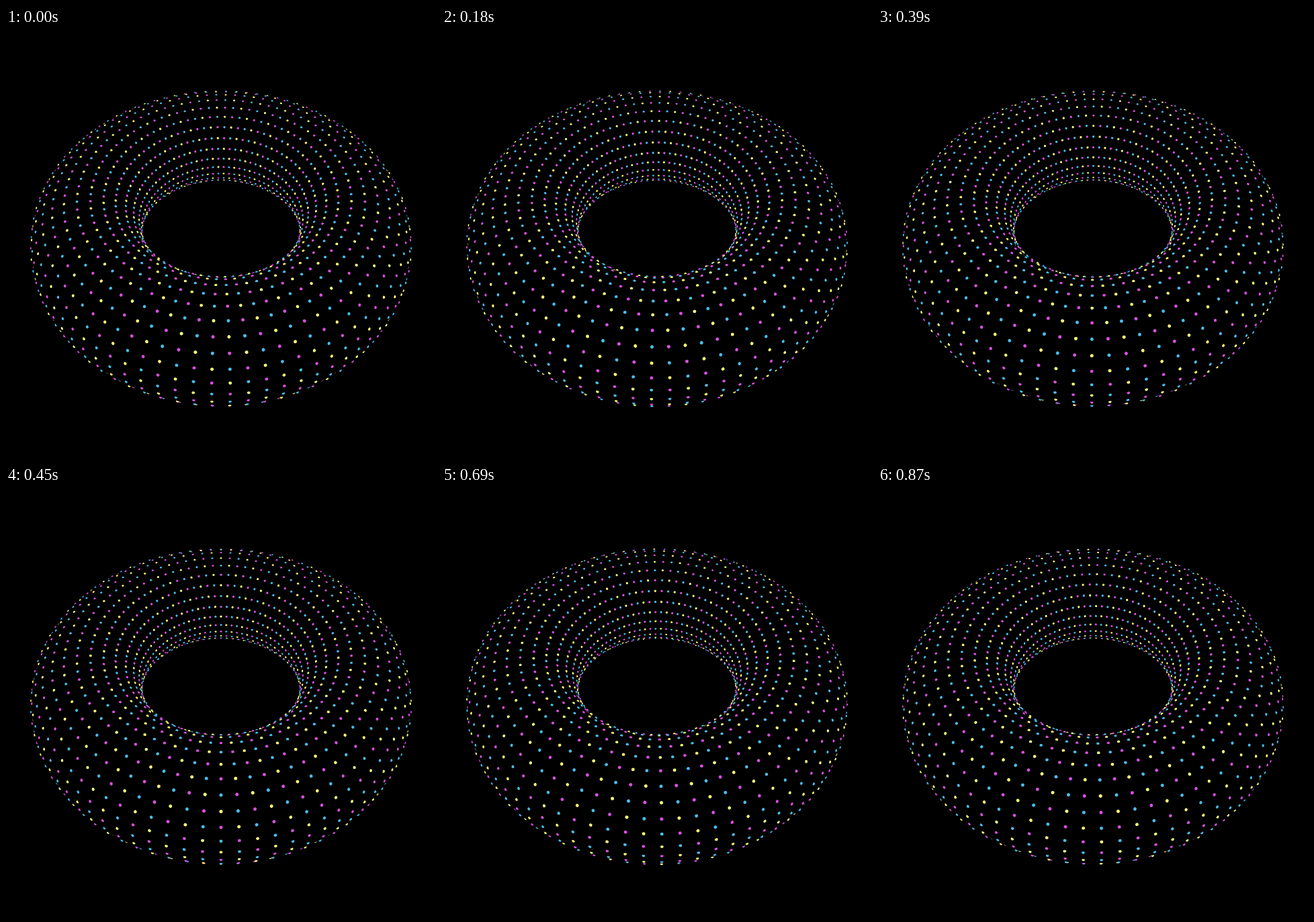
These frames come from a looping animation (640x640 px, 0.9 s). An HTML page with a canvas:

```html
<!DOCTYPE html>
<html lang="en">
<head>
<meta charset="utf-8">
<title>Dotted torus</title>
<style>
  html, body { margin: 0; width: 100%; height: 100%; overflow: hidden; background: #000; }
  canvas { display: block; width: 640px; height: 640px; }
</style>
</head>
<body>
<canvas id="stage" width="640" height="640"></canvas>
<script>
const ctx = document.getElementById('stage').getContext('2d');
const TAU = Math.PI * 2;
const LOOP = 900, STEP = 30;
const COLS = 84, ROWS = 28;
const COLORS = ['#d950e0', '#fcfc78', '#48bdec'];

// Tube radius is 1; the camera looks down at the ring.
const RING = 2.5705, DIST = 8.6105, LIFT = 0.4665, FOCAL = 648;
const CENTER = 320;
const TILT = 51.89 * Math.PI / 180;
const SIN = Math.sin(TILT), COS = Math.cos(TILT);
const DOT = 0.0234, ROW_PHASE = 0.155;
const HIDDEN = -Math.sqrt(2 * DOT);

// Tilt a vector: x right, y down, z away from the viewer.
function tilt(x, up, front) {
  return [x, front * SIN - up * COS, -front * COS - up * SIN];
}

// Each dot is a small ball half sunk into a black surface.
function drawDot(u, v, color) {
  const su = Math.sin(u), cu = Math.cos(u);
  const sv = Math.sin(v), cv = Math.cos(v);
  const rad = RING + cv;
  const [x, down, depth] = tilt(rad * su, sv, rad * cu);
  const y = down - LIFT, z = depth + DIST;
  const [nx, ny, nz] = tilt(cv * su, sv, cv * cu);

  const len = Math.hypot(x, y, z);
  const facing = -(nx * x + ny * y + nz * z) / len;
  if (facing <= HIDDEN) return;

  const scale = FOCAL / z;
  const px = CENTER + x * scale, py = CENTER + y * scale;
  const r = DOT * scale;
  const angle = Math.atan2(ny + facing * y / len, nx + facing * x / len);
  const inner = facing > 0 ? facing : facing * facing / (2 * DOT);
  ctx.fillStyle = color;
  ctx.beginPath();
  ctx.ellipse(px, py, r, r, angle, -TAU / 4, TAU / 4);
  ctx.ellipse(px, py, r * inner, r, angle, TAU / 4, -TAU / 4, facing < 0);
  ctx.fill();
}

// Per loop every dot advances one column and two rows.
function draw(p) {
  ctx.fillStyle = '#000';
  ctx.fillRect(0, 0, 640, 640);
  const shift = 2 * p + ROW_PHASE;
  const first = Math.ceil(-ROWS / 4 - shift);
  for (let i = 0; i < COLS; i++) {
    const u = (i + 0.5 + p) / COLS * TAU;
    for (let k = first; k < first + ROWS; k++) {
      drawDot(u, (k + shift) / ROWS * TAU, COLORS[(i + k + 32) % 3]);
    }
  }
}

const start = performance.now();
let shown = -1;
function tick() {
  const t = (performance.now() - start) % LOOP;
  const step = Math.floor(t / STEP);
  if (step !== shown) {
    shown = step;
    draw(step * STEP / LOOP);
  }
  requestAnimationFrame(tick);
}
tick();
</script>
</body>
</html>
```
